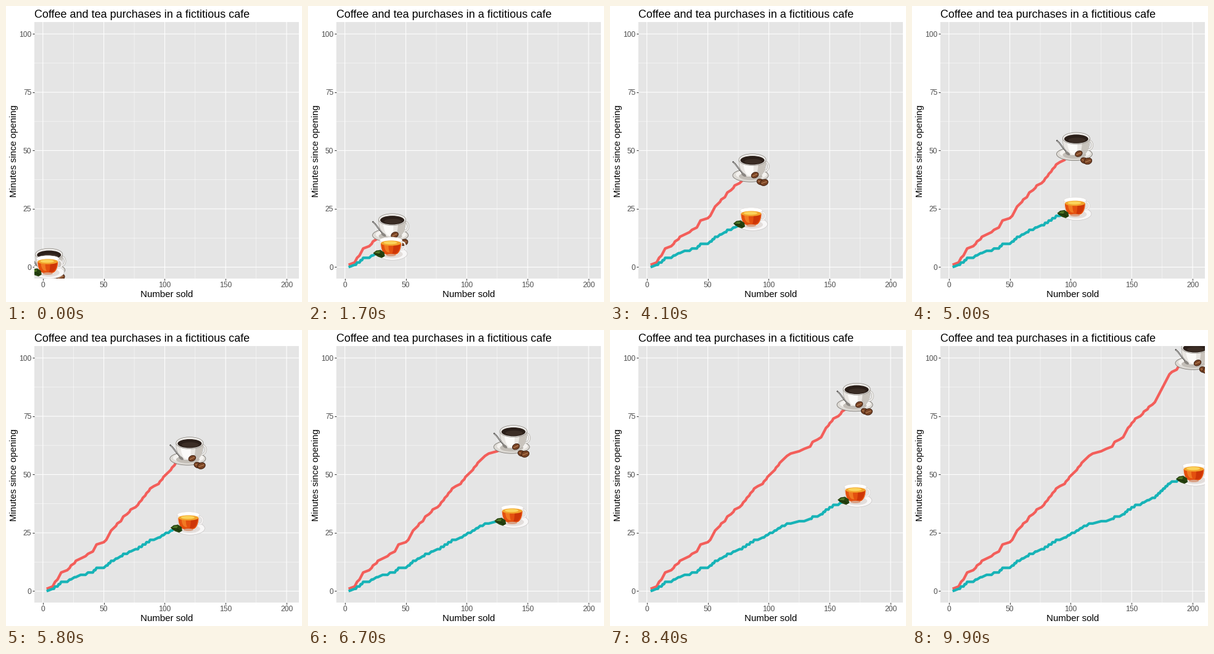
A matplotlib script that plays this animation: 480x480 px, repeating every 10000 ms.

```python
import numpy as np
import matplotlib.pyplot as plt
from matplotlib.animation import FuncAnimation
from matplotlib.patches import Ellipse, Polygon
from matplotlib.transforms import Affine2D

SIZE, DPI, FRAMES = 480, 72, 100
LEFT, RIGHT, TOP, BOTTOM = 46.3, 474.5, 26.4, 442.4
CORAL, TEAL = "#F35E5A", "#17B3B7"

plt.rcParams["font.family"] = "Liberation Sans"

# Cumulative sales at each minute; tea counts half the minutes.
sold = np.array([
    3, 8, 9, 10, 12, 13, 14, 15, 20, 22, 23, 26, 27, 31, 35, 37, 41, 42, 43, 44,
    50, 52, 53, 54, 55, 56, 58, 60, 61, 64, 65, 66, 69, 71, 72, 76, 78, 79, 81, 82,
    84, 85, 87, 88, 91, 95, 96, 98, 99, 101, 103, 105, 106, 108, 109, 111, 113, 115,
    118, 125, 129, 134, 135, 136, 140, 143, 144, 145, 146, 147, 149, 150, 152, 153,
    157, 159, 160, 163, 164, 167, *range(169, 182), 183, 187, 188, 191, 193, 196, 200])
minutes = np.arange(1, len(sold) + 1)

fig = plt.figure(figsize=(SIZE / DPI, SIZE / DPI), dpi=DPI, facecolor="white")
ax = fig.add_axes([LEFT / SIZE, 1 - BOTTOM / SIZE,
                   (RIGHT - LEFT) / SIZE, (BOTTOM - TOP) / SIZE])
ax.set_facecolor("#E5E5E5")
ax.set_xlim(-6.85, 209.85)
ax.set_ylim(-5, 105)
ax.set_xticks(range(0, 201, 50))
ax.set_yticks(range(0, 101, 25))
ax.set_xticks(range(25, 200, 50), minor=True)
ax.set_yticks(np.arange(12.5, 100, 25), minor=True)
ax.grid(which="major", color="white", lw=1.07, snap=False)
ax.grid(which="minor", color="white", lw=0.53, snap=False)
ax.set_axisbelow(True)
ax.tick_params(which="major", length=2.75, width=1.07, pad=2.2, color="#333333",
               labelsize=12, labelcolor="#4D4D4D")
ax.tick_params(which="minor", length=0)
for spine in ax.spines.values():
    spine.set_visible(False)


def label(x, y, text, size, **kw):
    fig.text(x / SIZE, 1 - y / SIZE, text, fontsize=size, color="black",
             va="baseline", **kw)


label(46, 19, "Coffee and tea purchases in a fictitious cafe", 18)
label((LEFT + RIGHT) / 2, 472, "Number sold", 15, ha="center")
fig.text(17 / SIZE, 1 - 235 / SIZE, "Minutes since opening", fontsize=15,
         rotation=90, rotation_mode="anchor", ha="center", va="baseline")


class Icon:
    """Flat drawing in pixels around its centre, y pointing down."""

    def __init__(self, z):
        self.z = z
        self.shift = Affine2D()

    def add(self, patch):
        patch.set_transform(self.shift)
        patch.set_zorder(self.z)
        ax.add_patch(patch)

    def oval(self, x, y, rx, ry, fill, edge="none", lw=0.0, angle=0):
        self.add(Ellipse((x, y), 2 * rx, 2 * ry, angle=angle, fc=fill, ec=edge, lw=lw))

    def shape(self, points, fill, edge="none", lw=0.0):
        self.add(Polygon(points, closed=True, fc=fill, ec=edge, lw=lw))

    def line(self, points, color, lw):
        self.add(Polygon(points, closed=False, fc="none", ec=color, lw=lw))

    def bowl(self, x, y, rx, base, depth, fill, side=(-1, 1), **kw):
        t = np.linspace(0, 1, 24)
        half = base + (rx - base) * np.sqrt(1 - t ** 2)
        a = np.column_stack([x + side[0] * half, y + depth * t])
        b = np.column_stack([x + side[1] * half, y + depth * t])
        self.shape(np.vstack([a, b[::-1]]), fill, **kw)

    def move(self, x, y):
        px, py = ax.transData.transform((x, y))
        self.shift.clear().scale(1, -1).translate(px + self.dx, py)


def coffee_icon():
    c = Icon(5)
    c.dx = 1
    c.oval(0, 8.5, 29, 10.5, "#DEDBD6", "#77736D", 0.8)
    c.oval(1, 7, 25, 8, "#F4F2EF")
    c.oval(0, 10, 19, 6, "#C3BEB7")
    c.oval(23, -6, 6, 7.5, "none", "#A9A59F", 3.2)
    c.oval(23, -6, 6, 7.5, "none", "#F3F2F0", 2)
    c.bowl(3, -16, 22, 8, 27, "#E9E6E2", edge="#A5A099", lw=0.6)
    c.bowl(3, -16, 21.5, 8, 26.5, "#C9C4BD", side=(0.45, 1))
    c.bowl(3, -16, 20, 7, 25, "#FBFAF8", side=(-0.75, 0.1))
    c.oval(3, -17, 22, 9.5, "#EFEDEA", "#86817A", 0.7)
    c.oval(3, -16, 19.5, 7.2, "#2B1F19")
    c.oval(4, -14, 14, 4.2, "#3B2D25")
    c.line([(-29, -14), (-25, -10), (-17, 0), (-9, 9)], "#3C3A38", 2.2)
    c.line([(-28, -13), (-17, -0.5), (-10, 7)], "#D9D7D4", 0.9)
    c.oval(-11, 7.5, 4.5, 2.2, "#8A8681", angle=35)
    for x, y, rx, ry, tilt in [(7, 8, 6, 4.4, -25), (16, 19, 6, 4.5, 20),
                               (22, 20, 6.5, 5, -20)]:
        c.oval(x, y, rx, ry, "#7A4425", "#3A1D0F", 0.9, tilt)
        a = np.radians(tilt)
        d = np.array([np.cos(a), np.sin(a)]) * rx * 0.7
        c.line([(x - d[0], y - d[1]), (x + d[0], y + d[1])], "#C08A5E", 1)
    return c


def tea_icon():
    t = Icon(6)
    t.dx = 2
    t.oval(2.5, 8, 24, 10.7, "#F8F7F7", "#C9C6C6", 0.7)
    t.oval(2, 9, 17, 6.5, "#E3DEDC")
    t.oval(18, -5, 5, 6, "none", "#D2CDCB", 2.6)
    t.oval(18, -5, 5, 6, "none", "#FCFBFB", 1.5)
    t.bowl(0, -14, 18, 8, 25, "#F7F1EC", edge="#CFC8C3", lw=0.5)
    t.bowl(0, -9, 16.5, 7, 18.5, "#E4500F")
    t.bowl(0, -8, 15.5, 6, 16, "#CE3608", side=(0.25, 0.95))
    t.bowl(0, -7, 14, 5, 13, "#F17A22", side=(-0.8, -0.3))
    t.oval(0, -14, 18, 4.8, "#FFFFFF", "#DDD8D5", 0.5)
    t.oval(0, -9, 16.3, 4.2, "#F2A32C")
    t.oval(-1, -9.7, 11, 2.6, "#FBD35A")
    t.oval(0, 10.5, 8, 2, "#D9A084")
    t.shape([(-29, 7), (-24, 3), (-17, 2), (-11, 6), (-10, 12), (-15, 15),
             (-21, 13), (-26, 10)], "#26420F")
    t.shape([(-27, 7), (-22, 4), (-17, 4), (-19, 8)], "#4F7526")
    t.line([(-27, 8), (-19, 9), (-12, 13)], "#142A08", 0.9)
    return t


class Series:
    def __init__(self, y, color, icon, z):
        self.y, self.icon = y, icon
        self.path, = ax.plot([], [], color=color, lw=4.27, zorder=z,
                             solid_capstyle="butt", solid_joinstyle="round")

    def reveal(self, tip):
        y = np.interp(tip, sold, self.y)
        past = sold < tip
        self.path.set_data(np.append(sold[past], tip), np.append(self.y[past], y))
        self.icon.move(tip, y)


series = [Series(minutes, CORAL, coffee_icon(), 3),
          Series(minutes // 2, TEAL, tea_icon(), 4)]


def draw(frame):
    tip = sold[0] + (sold[-1] - sold[0]) * frame / (FRAMES - 1)
    for s in series:
        s.reveal(tip)
    return []


anim = FuncAnimation(fig, draw, frames=FRAMES, interval=100, repeat=True,
                     repeat_delay=0, init_func=lambda: draw(0))
plt.show()
```
